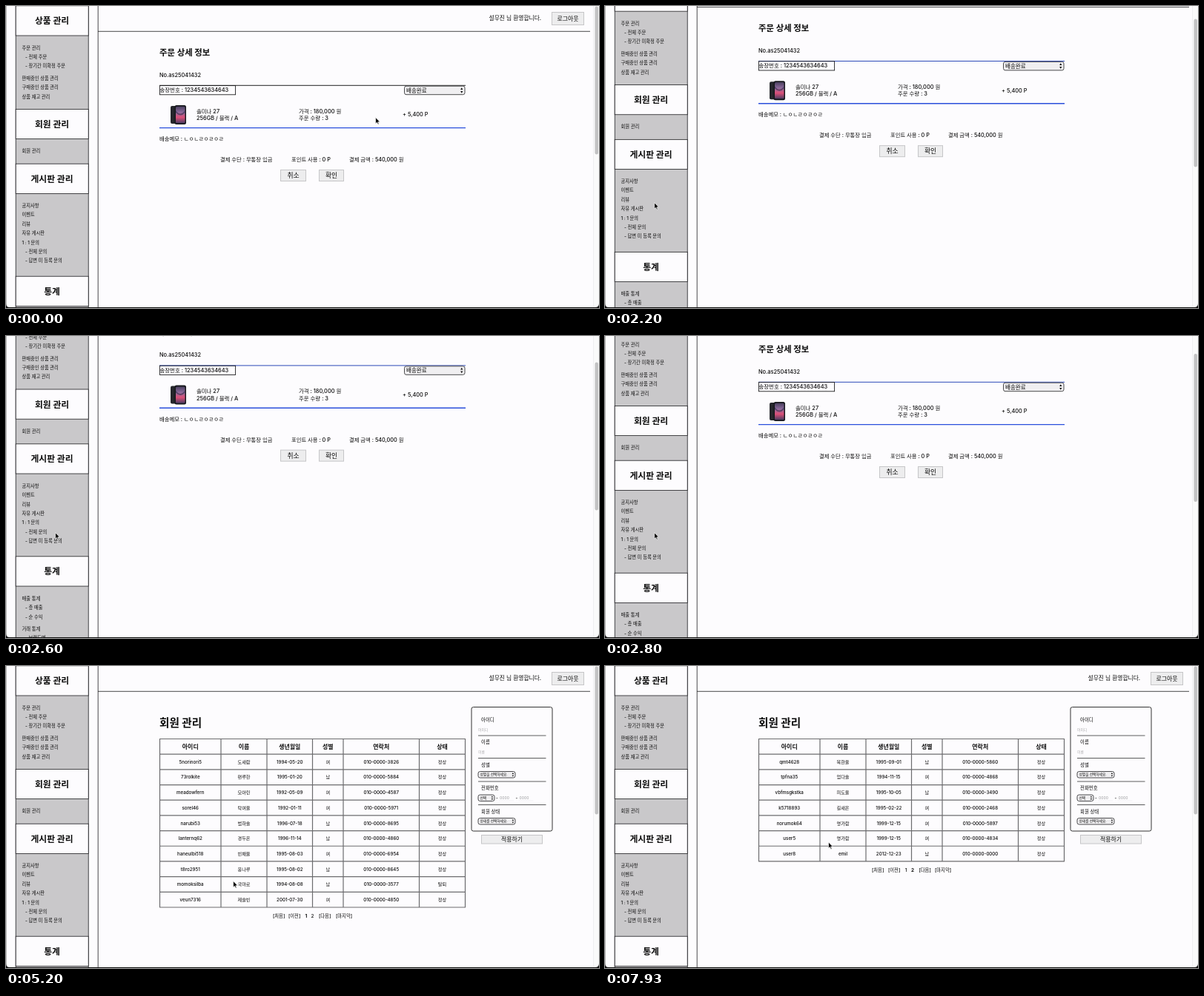
Write an HTML page that moves like this. It is 800x408 px and loops after 8 s.

```html
<!DOCTYPE html>
<html>
<head>
<meta charset="utf-8">
<style>
html, body { margin: 0; width: 100%; height: 100%; overflow: hidden; background: #fdfcfe; }
svg { display: block; width: 100vw; height: 100vh; }
text { font-family: Inter, "Noto Sans CJK KR", "Noto Sans CJK", "Noto Sans", sans-serif; white-space: pre; }
</style>
</head>
<body>
<svg id="stage" viewBox="0 0 800 408"></svg>
<script>
const LOOP = 8000;
const PAPER = '#fdfcfe', GREY = '#c9c8ca', INK = '#1c1c1e', HAIR = .8;

// Markup helpers; text is placed by its vertical centre.
function text(s, x, cy, size, o = {}) {
  return `<text x="${x}" y="${(cy + size * 0.37).toFixed(2)}" font-size="${size}" ` +
    `fill="${o.fill || '#0c0c0c'}" font-weight="${o.bold ? 700 : 500}" ` +
    `text-anchor="${o.mid ? 'middle' : 'start'}">${s}</text>`;
}
const mid = (s, x, cy, size, o = {}) => text(s, x, cy, size, { ...o, mid: true });
const rect = (x, y, w, h, fill, stroke = 'none', r = 0, sw = HAIR) =>
  `<rect x="${x}" y="${y}" width="${w}" height="${h}" rx="${r}" fill="${fill}" stroke="${stroke}" stroke-width="${sw}"/>`;
const line = (x1, y1, x2, y2, color = INK, w = HAIR, id = '') =>
  `<line ${id && `id="${id}"`} x1="${x1}" y1="${y1}" x2="${x2}" y2="${y2}" stroke="${color}" stroke-width="${w}"/>`;
const button = (s, x, y, w, h, size) =>
  rect(x + .5, y + .5, w - 1, h - 1, '#ededee', '#c6c6c8', 0, 1) + mid(s, x + w / 2, y + h / 2, size);

function select(s, x, y, w, h, size) {
  const ax = x + w - h * .38, cy = y + h / 2, a = h * .13, b = h * .08, c = h * .3;
  return rect(x + .5, y + .5, w - 1, h - 1, '#f0eff1', '#4a4a4c', 2.5, 1) + text(s, x + 3, cy, size) +
    `<path d="M${ax - a} ${cy - b}h${2 * a}l${-a} ${b - c}zM${ax - a} ${cy + b}h${2 * a}l${-a} ${c - b}z" fill="#111"/>`;
}

// Each section: title, top of its white box, then [label, centre, indented]
const MENU = [
  ['상품 관리', -.2, [['주문 관리', 57], ['- 전체 주문', 69, 1], ['- 장기간 미확정 주문', 81, 1],
    ['판매중인 상품 관리', 98], ['구매중인 상품 관리', 110], ['상품 재고 관리', 122.5]]],
  ['회원 관리', 139.4, [['회원 관리', 196]]],
  ['게시판 관리', 213.2, [['공지사항', 270], ['이벤트', 282], ['리뷰', 294.7], ['자유 게시판', 307],
    ['1 : 1 문의', 319.5], ['- 전체 문의', 332, 1], ['- 답변 미 등록 문의', 344, 1]]],
  ['통계', 365.2, [['매출 통계', 422], ['- 총 매출', 434, 1], ['- 순 수익', 447, 1],
    ['거래 통계', 463], ['- 브랜드별', 475, 1], ['- 기종별', 487, 1]]]
];

function sidebar() {
  let out = rect(13.2, -.5, 98, 780, GREY, INK);
  for (const [title, y, items] of MENU) {
    out += rect(13.2, y, 98, 40.2, PAPER, INK) + mid(title, 62, y + 20.3, 11.8, { bold: 1 });
    for (const [s, cy, sub] of items) out += text(s, sub ? 26 : 21.5, cy, 6.25);
  }
  return out;
}

function header() {
  return line(124, 34.3, 788, 34.3) + text('설무진 님 환영합니다.', 651.5, 16.5, 7.75) +
    button('로그아웃', 736, 8, 44, 18, 7.9);
}

function phone() {
  return rect(222, 135, 12, 24, '#25262b', 'none', 2) +
    rect(227.5, 134, 15.5, 26, '#17181d', 'none', 2.5) +
    rect(229, 135.8, 12.5, 22.4, 'url(#screen)', 'none', 1.5) +
    '<path d="M229 141q6 9 12.500 0v3q-6 7-12.500 0z" fill="#2a2c48" opacity=".6"/>';
}

function detail() {
  return text('주문 상세 정보', 207, 62.5, 11.4, { bold: 1 }) +
    text('No.as25041432', 207, 93, 7.4) +
    line(207, 107.3, 620, 107.3, INK, 1, 'topLine') +
    rect(207.4, 107.6, 102.2, 12.2, 'none', INK, 0, .9) +
    text('송장번호 : 1234543634643', 207.5, 113.6, 7.4) +
    select('배송완료', 537, 107.7, 82.5, 12.5, 7.5) +
    phone() +
    text('솔미나 27', 257, 141.8, 7.4) + text('256GB / 블랙 / A', 257, 151.3, 7.4) +
    text('가격 : 180,000 원', 395, 141.8, 7.4) + text('주문 수량 : 3', 395, 151.3, 7.4) +
    text('+ 5,400 P', 535, 146.7, 7.4) +
    line(207, 164.6, 620, 164.6, '#2a4fdc', 1.4) +
    text('배송메모 : ㄴㅇㄴㄹㅇㄹㅇㄹ', 207, 179.5, 7.3) +
    text('결제 수단 : 무통장 입금', 289, 207.5, 7.3) +
    text('포인트 사용 : 0 P', 385, 207.5, 7.3) +
    text('결제 금액 : 540,000 원', 463, 207.5, 7.3) +
    button('취소', 370, 221, 35, 16, 8.8) + button('확인', 422, 221, 34, 16, 8.8);
}

const COLS = [207.5, 290, 352, 413.5, 455, 557.5, 619.5];
const HEADS = ['아이디', '이름', '생년월일', '성별', '연락처', '상태'];
const PAGES = [
  `5norinori5 도새람 1994-05-20 여 3826
73rolkite 편루한 1995-01-20 남 5884
meadowfern 모아린 1992-05-09 여 4587
sorel46 탁여울 1992-01-11 여 5971
narubi53 범하솔 1996-07-18 남 8695
lanternq62 경두온 1996-11-14 남 4860
haneulbi518 빈채울 1995-08-03 여 6954
t8ro2951 옹나루 1995-08-02 남 8645
momoksilba 국마로 1994-08-08 남 3577 탈퇴
veun7316 제슬빈 2001-07-30 여 4850`,
  `qmt4628 복한울 1995-09-01 남 5860
tpfna35 엄다솔 1994-11-15 여 4868
vbfmsgkstka 피도울 1995-10-05 남 3490
k5718893 길새온 1995-02-22 여 2468
norumok64 명가람 1999-12-15 여 5897
user5 명가람 1999-12-15 여 4834
user8 emil 2012-12-23 남 0000`
];

function table(page) {
  const rows = PAGES[page].split('\n').map(r => {
    const [id, name, born, sex, tail, state = '정상'] = r.split(' ');
    return [id, name, born, sex, '010-0000-' + tail, state];
  });
  const top = 98.5, step = 20.68, end = top + step * (rows.length + 1);
  let out = '';
  [HEADS, ...rows].forEach((row, i) => {
    row.forEach((s, c) => {
      out += mid(s, (COLS[c] + COLS[c + 1]) / 2, top + step * (i + .5), i ? 6.2 : 7.9, { bold: !i });
    });
  });
  for (let i = 0; i <= rows.length + 1; i++) {
    out += line(207, top + step * i, 620, top + step * i, '#6c6c6e', 1.2);
  }
  for (const x of COLS) out += line(x, top, x, end, '#6c6c6e', 1.2);
  const y = end + 11.5, d = page;
  return out + text('[처음]', 360, y, 6.3) + text('[이전]', 381 + d, y, 6.3) +
    mid('1', 405 + d, y, 6.4, { bold: !page }) + mid('2', 413.5 + d * 1.5, y, 6.4, { bold: page }) +
    text('[다음]', 422 + d * 1.5, y, 6.3) + text('[마지막]', 445, y, 6.3);
}

function filters() {
  const hint = { fill: '#a9a9ab' };
  let out = rect(628, 55.5, 109, 167.5, 'none', '#333', 2.5, 1);
  [['아이디', 72.5], ['이름', 103], ['성별', 133.5], ['전화번호', 165], ['회원 상태', 197]]
    .forEach(([s, y]) => out += text(s, 641, y, 6.4));
  for (const y of [94, 124.5, 156, 187.5]) out += line(637, y, 728.5, y, '#333');
  out += text('아이디', 637, 86, 4.8, hint) + text('이름', 637, 116.5, 4.8, hint) +
    select('성별을 선택하세요.', 636.5, 142, 51, 9.5, 4.7) +
    select('선택', 636.5, 173.5, 23, 9.5, 4.7) +
    select('상태를 선택하세요.', 636.5, 205, 51, 9.5, 4.7);
  for (const x of [661, 687.5]) {
    out += text('-', x, 178, 6) + text('0000', x + 5, 178.3, 5, hint) +
      line(x + 4, 182, x + 24, 182, '#ececee', .7);
  }
  return out + button('적용하기', 641, 228, 83, 12.5, 7.9);
}

const stage = document.getElementById('stage');
stage.innerHTML = `
<defs><linearGradient id="screen" x1="0" y1="0" x2="0" y2="1">
<stop offset="0" stop-color="#4a4160"/><stop offset=".35" stop-color="#8d6a9c"/>
<stop offset=".65" stop-color="#dd5078"/><stop offset="1" stop-color="#4b3d62"/>
</linearGradient></defs>
${rect(0, 0, 800, 408, PAPER)}
<g id="scroll">${sidebar()}${header()}
<g id="detail">${detail()}</g>
<g id="members">${text('회원 관리', 207, 76.5, 14.6, { bold: 1 })}
<g id="page1">${table(0)}</g><g id="page2">${table(1)}</g>${filters()}</g></g>
${line(124.2, 0, 124.2, 408)}${line(.3, 0, .3, 408, '#777', .6)}
${rect(792.5, 0, 8, 408, '#fafafa')}${line(792.5, 0, 792.5, 408, '#ededee')}
<g id="thumb">${rect(794.5, 0.5, 4.5, 200, '#c2c2c3', 'none', 2.2)}</g>
<path d="M0 402V408H800V402Q800 407 795 407H5Q0 407 0 402Z" fill="#111"/>
<path id="cursor" d="M0 0V8.3L1.9 6.6L3.2 9.5L4.6 8.9L3.3 6.1H5.9Z" fill="#000" stroke="#fff" stroke-width=".7" stroke-linejoin="round"/>`;

const el = {};
for (const id of ['scroll', 'detail', 'members', 'page1', 'page2', 'thumb', 'cursor', 'topLine']) {
  el[id] = document.getElementById(id);
}

// Keys: time, then values
const MOVES = [
  [70, 498.6, 150.6], [870, 547, 149], [1000, 547, 149], [1530, 48, 376],
  [1730, 46, 298], [1870, 66.6, 265.7], [2930, 66.6, 265.7], [3600, 27, 164], [3800, 33, 154],
  [3930, 36.6, 153.7], [4530, 36.6, 153.7], [5200, 306.6, 290.6], [5400, 306.6, 290.6], [5930, 415, 333],
  [6130, 415, 333], [6530, 413, 337], [7140, 413, 337], [7530, 306, 240], [7800, 306, 240], [7930, 301.5, 238]
];
const SCROLL = [
  [2070, 0], [2130, 10], [2200, 32.5], [2270, 56], [2400, 78], [2500, 76], [2600, 67.5], [2700, 55], [2800, 45]
];
const linear = u => u;
const smooth = u => u * u * (3 - 2 * u);

function sample(keys, t, ease) {
  let i = 0;
  while (i < keys.length - 1 && keys[i + 1][0] <= t) i++;
  const a = keys[i], b = keys[i + 1] || a;
  const u = b === a ? 0 : ease(Math.max(0, (t - a[0]) / (b[0] - a[0])));
  return a.slice(1).map((v, k) => v + (b[k + 1] - v) * u);
}

const show = (node, on) => node.setAttribute('display', on ? 'inline' : 'none');
const move = (node, x, y) => node.setAttribute('transform', `translate(${x.toFixed(2)} ${y.toFixed(2)})`);

function draw(t) {
  const members = t >= 4600;
  const s = members ? 0 : sample(SCROLL, t, linear)[0];
  show(el.detail, !members);
  show(el.members, members);
  show(el.page1, members && t < 6870);
  show(el.page2, members && t >= 6870);
  move(el.scroll, 0, -s);
  move(el.thumb, 0, s * .52);
  el.topLine.setAttribute('stroke', s > 0 ? '#2b49b8' : '#222');
  move(el.cursor, ...sample(MOVES, t, smooth));
}

const start = performance.now();
function tick(now) {
  draw(Math.max(0, now - start) % LOOP);
  requestAnimationFrame(tick);
}
draw(0);
requestAnimationFrame(tick);
</script>
</body>
</html>
```
